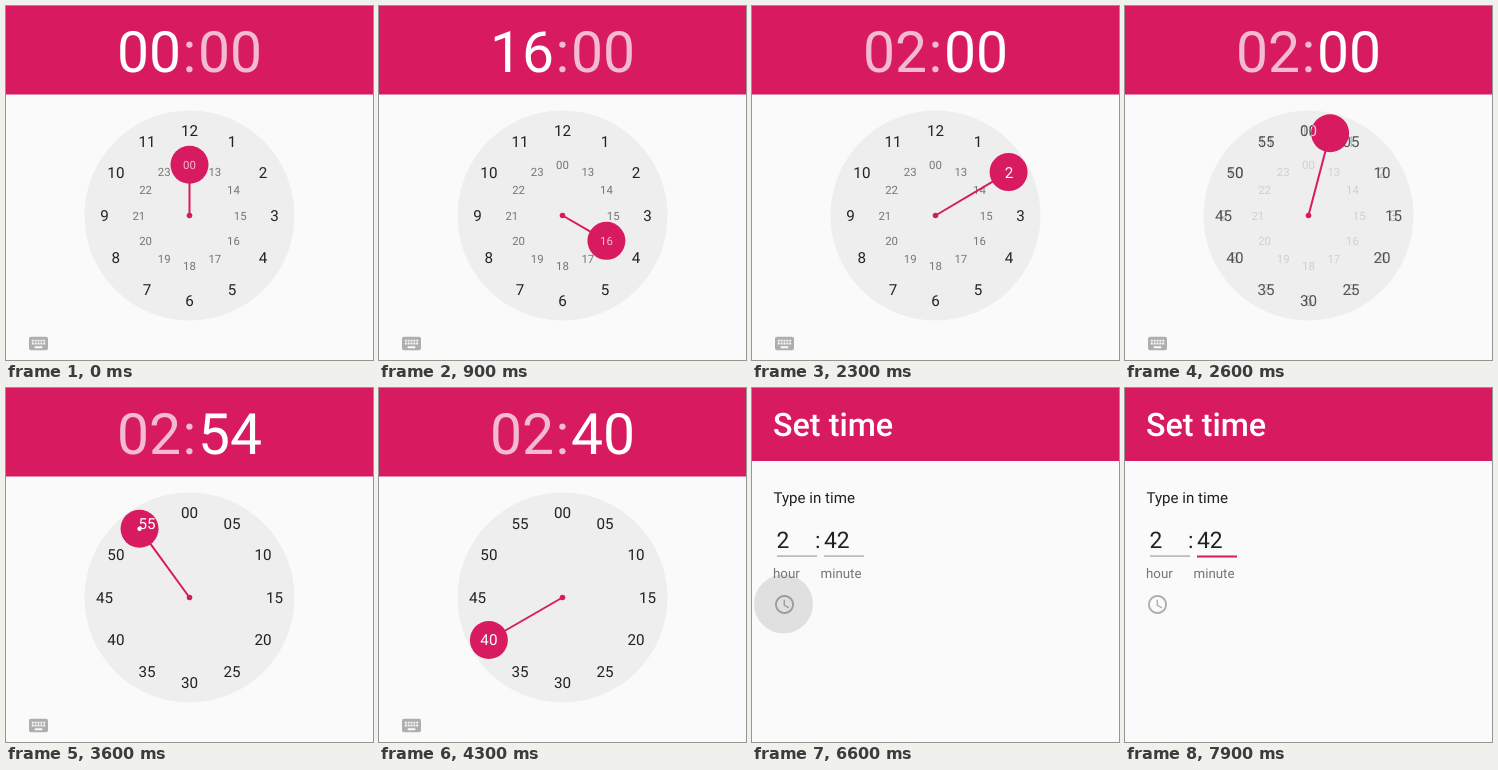
Animation of 367 by 354 pixels, one loop 8000 ms. Source, as an HTML page with a canvas:

```html
<!DOCTYPE html>
<html lang="en">
<head>
<meta charset="utf-8">
<title>Time picker</title>
<style>
html, body { margin: 0; width: 100%; height: 100%; overflow: hidden; background: #fafafa; }
canvas { display: block; width: 367px; height: 354px; }
</style>
</head>
<body>
<canvas id="stage"></canvas>
<script>
const W = 367, H = 354, LOOP = 8000, STEP = 100;
const PINK = '#d81b60', PAPER = '#fafafa', DARK = '#212121', GRAY = '#757575';
const ICON = 'rgba(0,0,0,.3)', DIM = 'rgba(255,255,255,.7)';
const CX = 183.5, CY = 209.5, DIAL = 105, OUTER = 85, INNER = 50.7, KNOB = 19;
const TO_MINUTES = 2265, FADE = 500, TYPING = 6600, FOCUS = 7900;

const HOURS = [[0, 0], [500, 13], [600, 14], [800, 15], [900, 16], [1400, 14], [1500, 2]];
const MINUTES = [[0, 0], [3600, 54], [3700, 49], [3800, 45], [4300, 40], [4600, 41], [4800, 42]];

const keyboardIcon = new Path2D('M20 5H4a2 2 0 0 0-2 2v10a2 2 0 0 0 2 2h16a2 2 0 0 0 2-2V7a2 2 0 0 0-2-2z' +
  'M11 8h2v2h-2zM11 11h2v2h-2zM8 8h2v2H8zM8 11h2v2H8zM5 8h2v2H5zM5 11h2v2H5z' +
  'M14 8h2v2h-2zM14 11h2v2h-2zM17 8h2v2h-2zM17 11h2v2h-2zM8 15h8v2H8z');
const clockIcon = new Path2D('M12 2a10 10 0 1 0 .01 0zM12 4a8 8 0 1 0 .01 0zM11 7h1.5v5.25l4.5 2.67-.75 1.23L11 13z');

const canvas = document.getElementById('stage');
const ctx = canvas.getContext('2d');
const ratio = window.devicePixelRatio || 1;
canvas.width = W * ratio;
canvas.height = H * ratio;
ctx.textRendering = 'geometricPrecision';

const pad = n => String(n).padStart(2, '0');
const lerp = (a, b, p) => a + (b - a) * p;
const valueAt = (keys, t) => keys.filter(k => k[0] <= t).pop()[1];
const polar = (deg, r) => {
  const a = deg * Math.PI / 180;
  return [CX + r * Math.sin(a), CY - r * Math.cos(a)];
};

function rect(x, y, w, h, color) {
  ctx.fillStyle = color;
  ctx.fillRect(x, y, w, h);
}

function disc(x, y, r, color) {
  ctx.beginPath();
  ctx.arc(x, y, r, 0, 2 * Math.PI);
  ctx.fillStyle = color;
  ctx.fill();
}

function text(str, x, y, size, color, align = 'left', weight = 400) {
  ctx.font = `${weight} ${size}px Roboto, sans-serif`;
  ctx.textAlign = align;
  ctx.fillStyle = color;
  ctx.fillText(str, x, y);
}

function icon(path, cx, cy) {
  const s = 0.95;
  ctx.save();
  ctx.translate(cx - 12 * s, cy - 12 * s);
  ctx.scale(s, s);
  ctx.fillStyle = ICON;
  ctx.fill(path, 'evenodd');
  ctx.restore();
}

// With a selected angle given, only the labels next to it are drawn.
function ring(radius, size, color, label, selected) {
  for (let i = 0; i < 12; i++) {
    const gap = Math.abs((i * 30 - selected + 540) % 360 - 180);
    if (gap >= 30) continue;
    const [x, y] = polar(i * 30, radius);
    text(label(i), x, y + size * 0.356, size, color, 'center');
  }
}

const outerHour = i => String(i || 12);
const innerHour = i => pad(i && i + 12);
const minuteLabel = i => pad(i * 5);

function drawDial(hour, minute, p) {
  const isInner = hour === 0 || hour > 12;
  const hourDeg = hour % 12 * 30;
  const minuteDeg = minute * 6;
  const angle = lerp(hourDeg, minuteDeg, p);
  const length = lerp(isInner ? INNER : OUTER, OUTER, p);
  const [x, y] = polar(angle, length);
  const [lineX, lineY] = polar(angle, length - KNOB + 1);

  disc(CX, CY, DIAL, '#eeeeee');
  ctx.globalAlpha = 1 - p;
  ring(OUTER, 15.2, DARK, outerHour);
  ring(INNER, 11.4, GRAY, innerHour);
  ctx.globalAlpha = p;
  ring(OUTER, 15.2, DARK, minuteLabel);
  ctx.globalAlpha = 1;

  ctx.beginPath();
  ctx.moveTo(CX, CY);
  ctx.lineTo(lineX, lineY);
  ctx.strokeStyle = PINK;
  ctx.lineWidth = 2;
  ctx.stroke();
  disc(CX, CY, 2.8, PINK);
  disc(x, y, KNOB, PINK);
  if (p === 1 && minute % 5) disc(x, y, 2.2, '#fff');

  ctx.save();
  ctx.beginPath();
  ctx.arc(x, y, KNOB, 0, 2 * Math.PI);
  ctx.clip();
  ctx.globalAlpha = 1 - p;
  if (isInner) ring(INNER, 11.4, DIM, innerHour, hourDeg);
  else ring(OUTER, 15.2, '#fff', outerHour, hourDeg);
  ctx.globalAlpha = p;
  ring(OUTER, 15.2, '#fff', minuteLabel, minuteDeg);
  ctx.restore();
}

function drawClock(t, hour, minute) {
  const onMinutes = t >= TO_MINUTES;
  const linear = Math.min(1, Math.max(0, (t - TO_MINUTES) / FADE));
  const size = 57, baseline = 66, gap = 8.4;
  rect(0, 0, W, 88.5, PINK);
  text(pad(hour), CX - gap, baseline, size, onMinutes ? DIM : '#fff', 'right');
  text(':', CX, baseline, size, DIM, 'center');
  text(pad(minute), CX + gap, baseline, size, onMinutes ? '#fff' : DIM);
  drawDial(hour, minute, (1 - Math.cos(Math.PI * linear)) / 2);
  icon(keyboardIcon, 32.5, 337.5);
}

function drawTyping(t, hour, minute) {
  const ripple = Math.max(0, 1 - (t - TYPING) / 300);
  rect(0, 0, W, 73, PINK);
  text('Set time', 21, 47.5, 32.3, '#fff', 'left', 500);
  text('Type in time', 21.5, 115, 15.1, DARK);
  disc(31.5, 216, 29.5, `rgba(0,0,0,${0.105 * ripple})`);
  text(hour, 24.5, 160, 22.8, DARK);
  text(':', 63, 160, 22.8, DARK);
  text(minute, 72, 160, 22.8, DARK);
  rect(25, 167.5, 40, 1.2, '#a0a0a0');
  if (t >= FOCUS) rect(72, 167.5, 40, 2, PINK);
  else rect(72, 167.5, 40, 1.2, '#a0a0a0');
  text('hour', 21, 190, 13.3, GRAY);
  text('minute', 68.5, 190, 13.3, GRAY);
  icon(clockIcon, 32.5, 216.5);
}

function frame() {
  const t = Math.floor(performance.now() % LOOP / STEP) * STEP;
  ctx.setTransform(ratio, 0, 0, ratio, 0, 0);
  rect(0, 0, W, H, PAPER);
  const draw = t < TYPING ? drawClock : drawTyping;
  draw(t, valueAt(HOURS, t), valueAt(MINUTES, t));
  requestAnimationFrame(frame);
}
frame();
</script>
</body>
</html>
```
